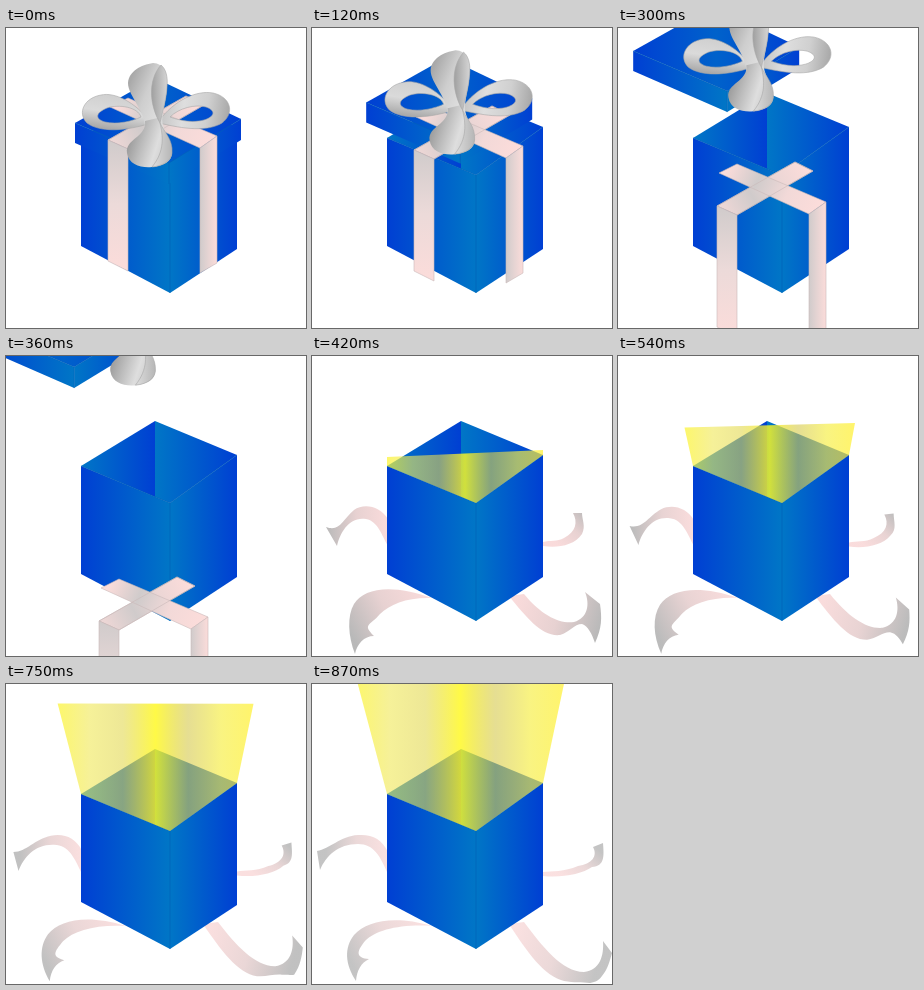
Write an HTML page with a canvas that moves like this. It is 300 px wide and 300 px high and loops after 900 ms.

```html
<!DOCTYPE html>
<html>
<head>
<meta charset="utf-8">
<style>
html, body { margin: 0; width: 100%; height: 100%; overflow: hidden; background: #fff; }
canvas { display: block; }
</style>
</head>
<body>
<canvas id="stage" width="300" height="300"></canvas>
<script>
const ctx = document.getElementById('stage').getContext('2d');
const FRAME = 30, FRAMES = 30, BURST = 9, OPEN = 13;
const DEEP = '#003fd3', MID = '#0076c6', EDGE = '#0060b8';

// Linear gradient from (x0,y0) to (x1,y1) with evenly spaced colours
function grad(x0, y0, x1, y1, ...colors) {
  const g = ctx.createLinearGradient(x0, y0, x1, y1);
  colors.forEach((c, i) => g.addColorStop(i / (colors.length - 1), c));
  return g;
}

function shape(d, fill, line) {
  const path = new Path2D(d);
  ctx.fillStyle = fill;
  ctx.fill(path, 'evenodd');
  if (line) {
    ctx.strokeStyle = line;
    ctx.lineWidth = 0.6;
    ctx.stroke(path);
  }
}

// Slow drift until the burst, then a fast one
function moved(f, slow, fast, draw) {
  const a = Math.min(f, BURST), b = Math.max(0, f - BURST);
  ctx.save();
  ctx.translate(slow[0] * a + fast[0] * b, slow[1] * a + fast[1] * b);
  draw();
  ctx.restore();
}

// Blend two path strings that share the same commands
function mix(from, to, u) {
  const target = to.match(/-?\d+/g);
  let i = 0;
  return from.replace(/-?\d+/g, n => +n + (target[i++] - n) * u);
}

const streamers = [
  { from: 'M14 171L25 190C28 176 38 160 54 163C66 165 70 180 76 190L76 163C68 150 52 147 42 154C30 164 28 176 14 171Z',
    to: 'M5 167L8 186C14 172 26 160 46 160C62 160 68 172 76 190L76 168C70 155 60 150 46 151C28 152 18 165 5 167Z',
    axis: [14, 175, 75, 175] },
  { from: 'M43 298C36 280 35 260 42 248C52 231 82 228 120 242C96 241 78 248 68 258C58 270 50 268 62 280C52 280 45 288 43 298Z',
    to: 'M44 297C33 280 32 264 42 251C55 237 82 231 120 242C88 240 64 246 53 257C44 268 44 274 57 275C49 279 45 286 44 297Z',
    axis: [40, 280, 115, 240] },
  { from: 'M197 240C215 262 230 281 248 279C258 276 262 268 270 268C276 270 280 278 283 287C290 272 290 262 288 248L273 236C278 248 276 262 262 266C248 268 230 260 212 238Z',
    to: 'M197 240C215 268 232 292 252 297C262 299 270 298 278 299C284 298 287 296 290 292C296 285 298 276 300 269L291 257C292 272 288 286 272 288C250 288 230 262 212 238Z',
    axis: [205, 240, 290, 265] },
  { from: 'M231 190C245 192 262 190 270 178C274 170 270 164 270 157L261 157C266 166 264 176 252 182C245 186 238 184 231 186Z',
    to: 'M231 192C250 194 270 190 280 183C293 182 292 172 291 159L281 163C286 172 280 180 266 182C252 188 240 187 231 188Z',
    axis: [275, 155, 245, 188] }
];

function drawStreamers(f) {
  const u = (f - 14) / 15;
  ctx.globalAlpha = 0.95 - 0.15 * u;
  streamers.forEach(({ from, to, axis }, i) => {
    const colors = ['#b5b5b5', '#e6cfcf', '#f9d9d9'];
    if (i === 2) colors.reverse();
    shape(mix(from, to, u), grad(...axis, ...colors));
  });
  ctx.globalAlpha = 1;
}

function drawInside() {
  shape('M75 110L149 65V141Z', grad(75, 0, 149, 0, MID, DEEP));
  shape('M149 65L231 99L164 147L149 141Z', grad(149, 0, 231, 0, MID, DEEP));
}

function drawFront() {
  shape('M75 110L164 147V265L75 218Z', grad(75, 0, 164, 0, DEEP, MID));
  shape('M164 147L231 99V221L164 265Z', grad(164, 0, 231, 0, MID, DEEP));
  shape('M75 110L164 147L231 99M164 147V265', 'transparent', EDGE);
}

function drawLight(f) {
  const n = f - 14;
  const lx = 75 - 2.125 * n, ly = 101 - 7.4 * n;
  const rx = 231 + 1.5 * n, ry = 94 - 6.75 * n;
  shape(`M75 110L${lx} ${ly}L${rx} ${ry}L231 99L164 147Z`,
    grad(lx, 0, rx, 0, 'rgba(252,244,50,.72)', 'rgba(240,232,90,.62)', 'rgba(226,216,80,.6)',
      'rgba(255,248,30,.82)', 'rgba(214,202,80,.62)', 'rgba(246,238,70,.68)', 'rgba(255,240,50,.72)'));
}

function drawLid() {
  shape('M69 95L149 50L235 91L163 135Z', grad(69, 0, 235, 0, DEEP, '#0062cb', DEEP));
  shape('M69 95L163 135V156L69 115Z', grad(69, 0, 163, 0, DEEP, MID));
  shape('M163 135L235 91V112L163 156Z', grad(163, 0, 235, 0, MID, DEEP));
  shape('M69 95L163 135L235 91M163 135V156', 'transparent', EDGE);
}

function drawStraps() {
  const line = '#c9b9b9', pink = '#fbdcda', gray = '#d0cbcb';
  const rising = 'M180 68L198 77L122 121L102 112Z';
  shape(rising, grad(190, 72, 110, 116, pink, '#ecd6d5', gray, '#ecd6d5'), line);
  shape('M122 70L104 79L194 120L211 108Z', grad(112, 75, 202, 114, pink, gray, '#f2d9d8', pink), line);
  shape(rising, 'transparent', line);
  shape('M102 112L122 121V243L102 233Z', grad(0, 112, 0, 240, gray, '#ecdad9', pink), line);
  shape('M194 120L211 108V235L194 245Z', grad(194, 0, 211, 0, gray, '#e6d4d3', pink), line);
}

function drawBow() {
  const line = '#a8a8a8';
  ctx.translate(153, 93);
  // Side loops
  shape('M-8 2C-24 -20 -45 -29 -58 -26C-75 -23 -82 -8 -72 2C-60 11 -35 11 -8 2ZM-18 -4C-21 -14 -40 -17 -52 -13C-64 -8 -64 -2 -54 1C-42 4 -26 0 -18 -4Z',
    grad(-45, -27, -50, 9, '#cfcfcf', '#dadada', '#a6a6a6'), line);
  shape('M0 0C15 -21 38 -31 54 -28C72 -24 76 -8 63 2C48 11 25 8 0 2ZM11 -4C20 -13 36 -17 47 -14C58 -10 55 -4 45 -1C34 2 22 0 11 -4Z',
    grad(0, -8, 70, 2, '#c2c2c2', '#dedede', '#d0d0d0', '#a6a6a6'), line);
  // Upper and lower loops share a wide waist
  shape('M-14 8C-13 -10 -31 -25 -31 -38C-30 -50 -18 -56 -6 -58C5 -58 9 -46 8 -34C7 -18 3 -10 3 4Z',
    grad(-31, -35, 5, -20, '#a9a9a9', '#cecece', '#dedede'));
  shape('M-14 0C-12 16 -34 18 -32 32C-30 44 -18 47 -7 46C5 45 13 40 13 32C13 18 3 12 3 -4Z',
    grad(-30, 15, 12, 28, '#989898', '#bcbcbc', '#dedede', '#c8c8c8'));
  shape('M2 -56C-12 -40 -9 -15 1 2C4 -12 7 -20 8 -34C9 -44 7 -52 2 -56Z',
    grad(-7, 0, 8, 0, '#a2a2a2', '#d4d4d4'), line);
  shape('M1 2C5 11 14 18 13 32C12 40 4 45 -7 46C6 30 4 15 1 2Z',
    grad(-4, 0, 13, 0, '#d8d8d8', '#b6b6b6'), line);
}

function render(f) {
  ctx.fillStyle = '#fff';
  ctx.fillRect(0, 0, 300, 300);
  const open = f >= OPEN;
  if (open) drawStreamers(f);
  drawInside();
  drawFront();
  if (open) {
    drawLight(f);
  } else {
    moved(f, [-3.7, -5.1], [-20.5, -26], drawLid);
    moved(f, [0, 2.5], [-3, 43.5], drawStraps);
    moved(f, [-0.85, -3.2], [-3, -27], drawBow);
  }
}

const start = performance.now();
function tick() {
  render(Math.floor((performance.now() - start) / FRAME) % FRAMES);
  requestAnimationFrame(tick);
}
tick();
</script>
</body>
</html>
```
